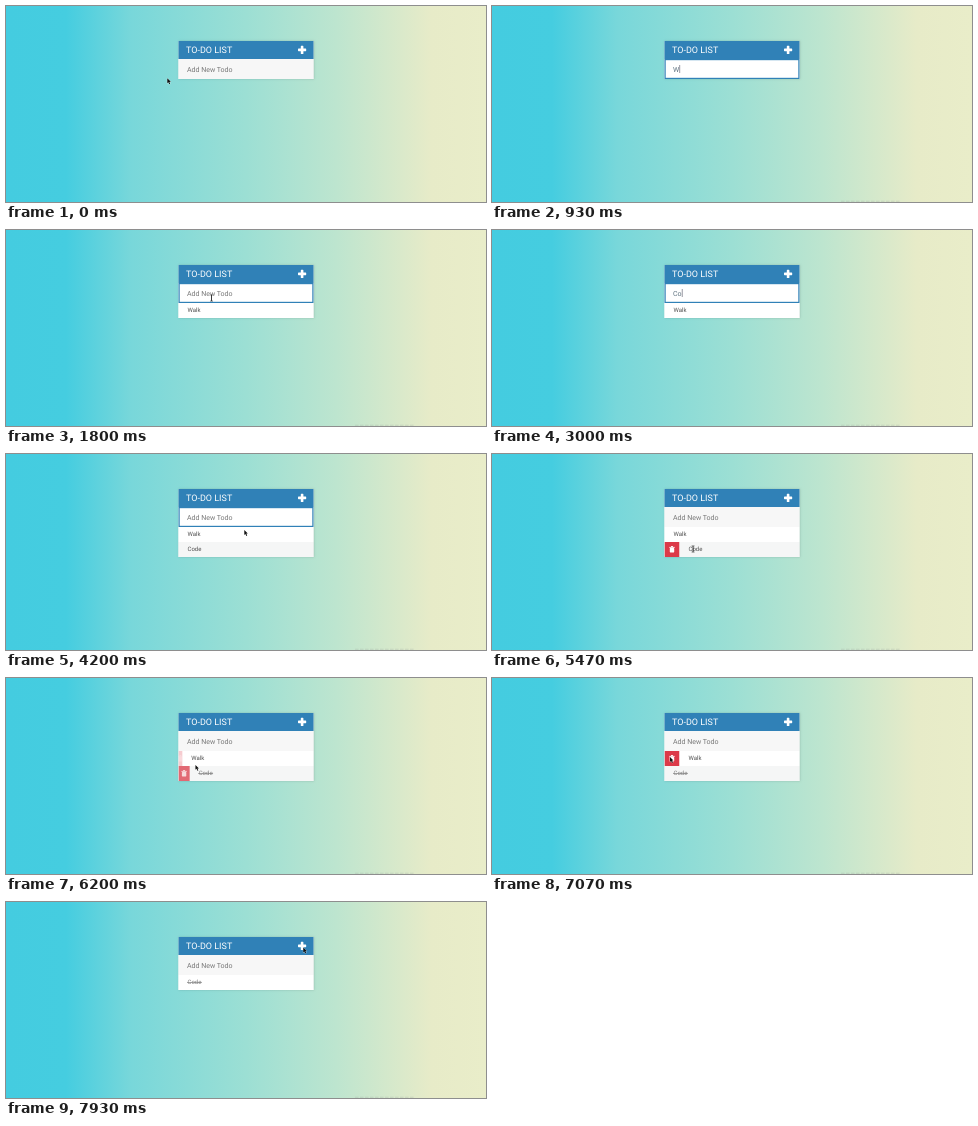
Animation of 480x196 px, one loop 8 s. Source, as an HTML page with a canvas:

```html
<!DOCTYPE html>
<html lang="en">
<head>
<meta charset="utf-8">
<title>To-do list</title>
<style>
  html, body { margin: 0; width: 100%; height: 100%; overflow: hidden; }
  canvas { display: block; width: 480px; height: 196px; }
</style>
</head>
<body>
<canvas width="480" height="196"></canvas>
<script>
const ctx = document.querySelector('canvas').getContext('2d');
ctx.textRendering = 'geometricPrecision';

const LOOP = 8000;
const LEFT = 172.5, WIDTH = 135, LIST_TOP = 73, ROW = 15;
const BLUE = '#3081b7';

// Pointer stops: time, x, y
const pointerPath = [
  [0, 161.3, 72.3], [70, 161.3, 72.3], [530, 205.5, 68],
  [1800, 205.5, 68], [2070, 242, 63],
  [4070, 242, 65], [4200, 238.3, 76], [4600, 208, 80],
  [4900, 204, 83], [5200, 201, 95], [5900, 201, 95],
  [6500, 178, 79], [7450, 178, 79], [7870, 296.5, 45], [7930, 297.3, 45.6]
];
const typed = [
  [930, 'W'], [1000, 'Wal'], [1070, 'Walk'], [1130, ''],
  [2670, 'C'], [3000, 'Co'], [3070, 'Cod'], [3270, 'Code'], [3470, '']
];

const clamp = v => Math.max(0, Math.min(1, v));
const between = (t, a, b) => t >= a && t < b;
// Linear 200 ms reveal while hovered from a to b
const hover = (t, a, b) => clamp((t - a) / 200) * (1 - clamp((t - b) / 200));

function rect(x, y, w, h, color) {
  ctx.fillStyle = color;
  ctx.fillRect(x, y, w, h);
}

function text(str, x, y, size, color) {
  ctx.font = `${size}px Roboto, sans-serif`;
  ctx.fillStyle = color;
  ctx.fillText(str, x, y);
  return ctx.measureText(str).width;
}

function drawBackground(t) {
  const g = ctx.createLinearGradient(0, 0, 480, 0);
  [[0, '#44cce0'], [60, '#45cde0'], [125, '#78d7da'], [240, '#9cdfd4'],
   [330, '#bde5cf'], [425, '#e7ebc8'], [480, '#e9edc9']]
    .forEach(([x, color]) => g.addColorStop(x / 480, color));
  rect(0, 0, 480, 196, g);
  if (t < 470) return;
  for (let x = 349; x < 409; x += 5) rect(x, 194.6, 3.5, 1.4, 'rgba(150,160,155,.22)');
}

function drawHeader() {
  rect(LEFT, 35, WIDTH, 18, BLUE);
  text('TO-DO LIST', 180, 47.2, 9, '#fff');
  ctx.fillStyle = '#fff';
  ctx.beginPath();
  ctx.roundRect(292, 42.6, 8.2, 2.6, .6);
  ctx.roundRect(294.8, 39.8, 2.6, 8.2, .6);
  ctx.fill();
}

function drawInput(t) {
  const focused = between(t, 530, 4930);
  rect(LEFT, 53, WIDTH, 20, focused ? '#fff' : '#f7f7f7');
  if (focused) {
    ctx.strokeStyle = BLUE;
    ctx.lineWidth = 1.2;
    ctx.strokeRect(LEFT + .6, 53.6, WIDTH - 1.2, 18.8);
  }
  const entry = typed.filter(([start]) => t >= start).pop();
  const value = entry ? entry[1] : '';
  const width = text(value || 'Add New Todo', 181, 65.6, 7, value ? '#5f7380' : '#777');
  if (value || between(t, 2530, 2670)) rect(181.3 + (value ? width : 0), 59, .6, 8, '#556');
}

function drawTrash(x, y) {
  rect(x - 2.7, y - 2.4, 5.4, .9, '#fff');
  rect(x - 1, y - 3.2, 2, .9, '#fff');
  ctx.beginPath();
  ctx.roundRect(x - 2.2, y - 1.2, 4.4, 4.3, .6);
  ctx.fill();
}

function drawRow(label, index, { reveal, done = false, opacity = 1 }) {
  const y = LIST_TOP + index * ROW;
  ctx.save();
  ctx.globalAlpha = opacity;
  rect(LEFT, y, WIDTH, ROW, index % 2 ? '#f5f6f6' : '#fff');
  const x = 181.5 + ROW * reveal;
  const width = text(label, x, y + 9.2, 6, done ? '#808080' : '#505050');
  if (done) rect(x - .5, y + 7, width + 1, .7, '#808080');
  if (reveal > 0) {
    ctx.beginPath();
    ctx.rect(LEFT, y, ROW * reveal, ROW);
    ctx.clip();
    ctx.globalAlpha = opacity * reveal;
    rect(LEFT, y, ROW, ROW, '#dc3a49');
    drawTrash(LEFT + ROW * reveal / 2, y + 7.3);
  }
  ctx.restore();
}

function drawList(t) {
  const removed = t >= 7570;
  if (t >= 1130 && !removed) drawRow('Walk', 0, {
    reveal: Math.max(hover(t, 4200, 4950), hover(t, 6150, LOOP)),
    opacity: 1 - clamp((t - 7070) / 500)
  });
  if (t >= 3470) drawRow('Code', removed ? 0 : 1, {
    reveal: hover(t, 4950, 6150),
    done: t >= 5800
  });
}

function pointerAt(t) {
  const i = pointerPath.findIndex(([time]) => time > t);
  if (i < 0) return pointerPath.at(-1).slice(1);
  const [t0, x0, y0] = pointerPath[i - 1], [t1, x1, y1] = pointerPath[i];
  const p = (t - t0) / (t1 - t0), e = p * p * (3 - 2 * p);
  return [x0 + (x1 - x0) * e, y0 + (y1 - y0) * e];
}

function drawPointer(t) {
  if (between(t, 930, 1800) || between(t, 2670, 4070)) return;
  const [x, y] = pointerAt(t);
  const overInput = x > LEFT && between(y, 53, 73);
  const overText = between(x, 196, 211) && between(y, 76, 100);
  if (overInput || overText) {
    rect(x - .4, y - 3, .9, 6, '#222');
    rect(x - 1.4, y - 3.4, 2.9, .7, '#444');
    rect(x - 1.4, y + 2.7, 2.9, .7, '#444');
    return;
  }
  ctx.beginPath();
  [[0, 0], [0, 4.9], [1.1, 3.9], [2, 5.9], [2.9, 5.5], [2, 3.6], [3.5, 3.5]]
    .forEach(([dx, dy]) => ctx.lineTo(x + dx, y + dy));
  ctx.closePath();
  ctx.strokeStyle = 'rgba(255,255,255,.6)';
  ctx.lineWidth = .8;
  ctx.stroke();
  ctx.fillStyle = '#111';
  ctx.fill();
}

function draw(now) {
  const t = now % LOOP;
  drawBackground(t);
  const rows = (t >= 1130) + (t >= 3470) - (t >= 7570);
  ctx.save();
  ctx.shadowColor = 'rgba(0,0,0,.18)';
  ctx.shadowBlur = 2;
  rect(LEFT, 35, WIDTH, 38 + rows * ROW, '#f7f7f7');
  ctx.restore();
  drawHeader();
  drawInput(t);
  drawList(t);
  drawPointer(t);
}

const start = performance.now();
function frame() {
  draw(performance.now() - start);
  requestAnimationFrame(frame);
}
frame();
</script>
</body>
</html>
```
